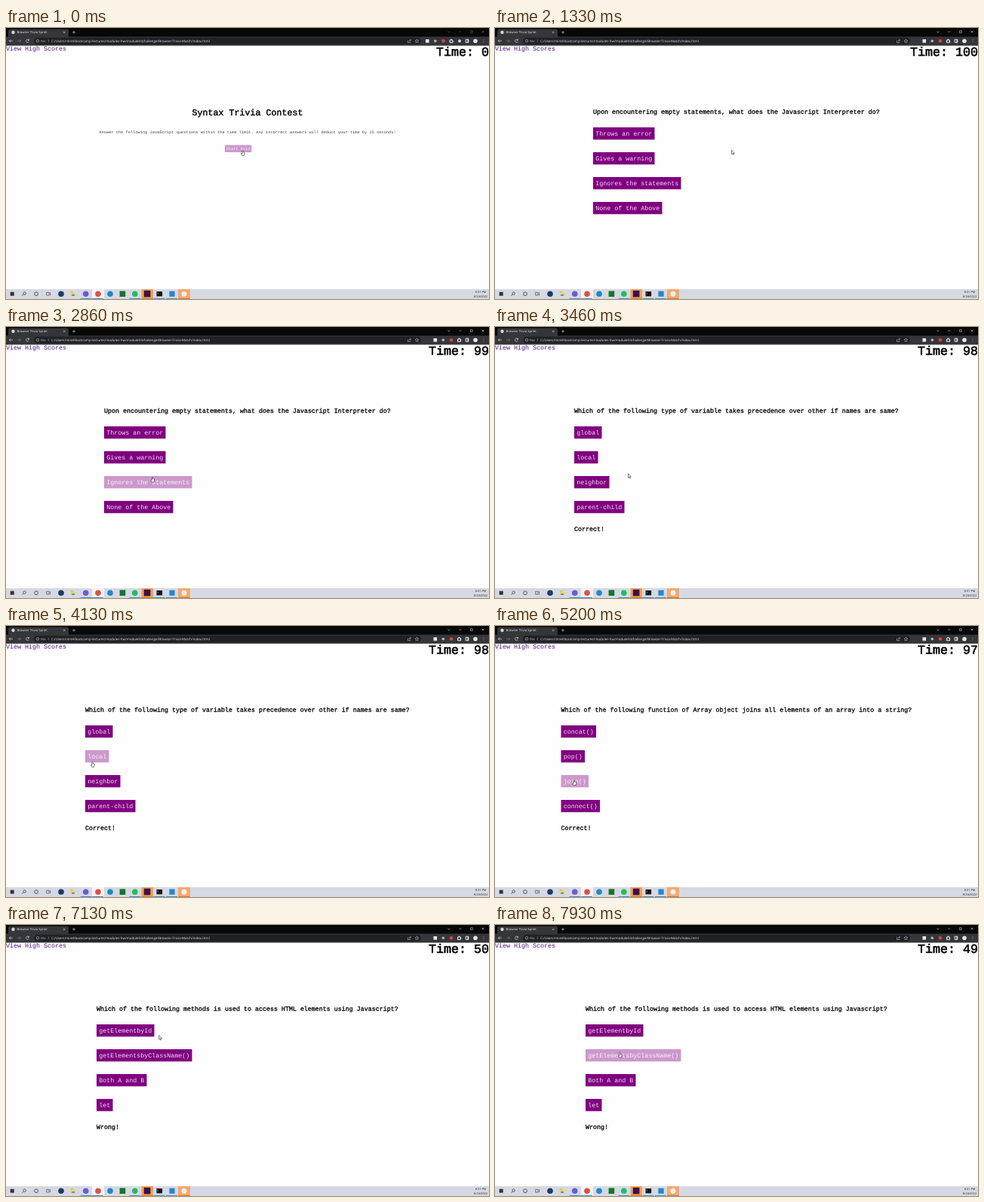
Recreate the animation shown at these times as an HTML page with a canvas. Size 640x360 px, loop 8000 ms.

```html
<!DOCTYPE html>
<html lang="en">
<head>
<meta charset="utf-8">
<title>Quiz</title>
<style>
  html, body { margin: 0; height: 100%; overflow: hidden; background: #fff; }
  canvas { display: block; }
</style>
</head>
<body>
<canvas id="stage" width="640" height="360"></canvas>
<script>
const ctx = document.getElementById('stage').getContext('2d');
const LOOP = 8000, FIRST_TICK = 2330;
const MONO = '"Liberation Mono", monospace', SANS = '"Open Sans", sans-serif';
const PURPLE = '#800080', FADED = '#cc99cc';
const CHAR = 5, BODY = 25 / 3;

// Each question appears at its start time; penalty is the total deducted so far.
const questions = [
  { start: 1260, penalty: 0, text: 'Upon encountering empty statements, what does the Javascript Interpreter do?',
    options: ['Throws an error', 'Gives a warning', 'Ignores the statements', 'None of the Above'] },
  { start: 3130, penalty: 0, verdict: 'Correct!',
    text: 'Which of the following type of variable takes precedence over other if names are same?',
    options: ['global', 'local', 'neighbor', 'parent-child'] },
  { start: 4330, penalty: 0, verdict: 'Correct!',
    text: 'Which of the following function of Array object joins all elements of an array into a string?',
    options: ['concat()', 'pop()', 'join()', 'connect()'] },
  { start: 5400, penalty: 15, verdict: 'Wrong!', text: 'In which HTML element, we put the JavaScript code?',
    options: ['<javascript>', '<style>', '<css>', '<script>'] },
  { start: 6800, penalty: 45, verdict: 'Wrong!',
    text: 'Which of the following methods is used to access HTML elements using Javascript?',
    options: ['getElementbyId', 'getElementsbyClassName()', 'Both A and B', 'let'] }
];

// Pointer stops: time, x, y.
const stops = [
  [0, 313.5, 162.3], [1460, 313.5, 162.3], [2600, 194, 199], [3200, 194, 199], [4060, 114.5, 180.3],
  [4400, 114.5, 180.3], [5060, 105, 204.5], [5460, 105, 204.5], [6230, 194.5, 147], [6330, 194.5, 147],
  [6600, 212, 141], [6860, 212, 141], [7800, 165.5, 169], [LOOP, 165.5, 169]
];

function rect(x, y, w, h, color) {
  ctx.fillStyle = color;
  ctx.fillRect(x, y, w, h);
}

function disc(x, y, r, color) {
  ctx.fillStyle = color;
  ctx.beginPath();
  ctx.arc(x, y, r, 0, Math.PI * 2);
  ctx.fill();
}

function ring(x, y, r, color, width = 0.7) {
  ctx.strokeStyle = color;
  ctx.lineWidth = width;
  ctx.beginPath();
  ctx.arc(x, y, r, 0, Math.PI * 2);
  ctx.stroke();
}

function stroke(d, color, width = 0.7) {
  ctx.strokeStyle = color;
  ctx.lineWidth = width;
  ctx.stroke(new Path2D(d));
}

// Heavy text is regular text with a fine outline, lighter than the bold face.
function text(str, x, y, size, { color = '#000', heavy = false, family = MONO, align = 'left' } = {}) {
  ctx.font = `${size}px ${family}`;
  ctx.fillStyle = ctx.strokeStyle = color;
  ctx.textAlign = align;
  ctx.fillText(str, x, y);
  if (heavy) {
    ctx.lineWidth = size * 0.035;
    ctx.strokeText(str, x, y);
  }
}

function pointerAt(t) {
  const i = stops.findIndex(s => s[0] > t);
  const [t0, x0, y0] = stops[i - 1], [t1, x1, y1] = stops[i];
  const p = (t - t0) / (t1 - t0), e = p * p * (3 - 2 * p);
  return { x: x0 + (x1 - x0) * e, y: y0 + (y1 - y0) * e };
}

function button(label, x, y, w, h, size, pad, pointer) {
  const hover = pointer.x >= x && pointer.x <= x + w && pointer.y >= y && pointer.y <= y + h;
  rect(x, y, w, h, hover ? FADED : PURPLE);
  text(label, x + pad, y + h / 2 + size * 0.34, size, { color: '#ffffffe0' });
  return hover;
}

function drawIntro(pointer) {
  text('Syntax Trivia Contest', 320, 116, 35 / 3, { heavy: true, align: 'center' });
  text('Answer the following JavaScript questions within the time limit. ' +
       'Any incorrect answers will deduct your time by 15 seconds!',
       320, 139.7, 16 / 3, { color: '#444', align: 'center' });
  return button('Start Quiz', 290, 155.5, 35.3, 9.5, 16 / 3, 1.67, pointer);
}

function drawQuestion(q, pointer) {
  const x = 320 - q.text.length * CHAR / 2;
  text(q.text, x, 114, BODY, { heavy: true });
  const hovers = q.options.map((label, i) =>
    button(label, x, 132 + i * 33, label.length * CHAR + 6.5, 16.3, BODY, 3.33, pointer));
  if (q.verdict) text(q.verdict, x, 270.8, BODY, { heavy: true });
  return hovers.includes(true);
}

function drawPointer({ x, y }, hand) {
  const shape = new Path2D(hand
    ? 'M-.6 .6Q0-.5 .6 .6V2.4L2.6 3V5L1.9 7H-.8L-2.2 4.4L-1.6 3.8L-.6 4.5Z'
    : 'M0 0V5.4L1.3 4.3L2.1 6.2L3 5.8L2.2 4H3.8Z');
  ctx.save();
  ctx.translate(x, y);
  ctx.fillStyle = '#fff';
  ctx.fill(shape);
  ctx.strokeStyle = '#222';
  ctx.lineWidth = 0.6;
  ctx.stroke(shape);
  ctx.restore();
}

// Before the window has focus its controls are dim and one more extension shows.
function drawBrowser(focused) {
  const light = '#d5d6d8', controls = focused ? '#f0f0f0' : '#777';
  rect(0, 0, 640, 12, '#080808');
  ctx.fillStyle = '#35363a';
  ctx.beginPath();
  ctx.roundRect(3, 1.5, 80, 12, 2.5);
  ctx.fill();
  rect(0, 11.5, 640, 12, '#35363a');
  disc(9.5, 5.7, 2.2, light);
  text('Browser Trivia Sprint', 14.5, 7.2, 4.2, { color: '#eee', family: SANS });
  stroke('M76 4.5l2.4 2.4m0-2.4l-2.4 2.4M88 5.7h4M90 3.7v4', light, 0.6);
  stroke('M585.5 4.5l1.5 1.5l1.5-1.5M600.3 5h3M615.6 3.7h2.6v2.6h-2.6zM630.7 3.7l2.6 2.6m0-2.6l-2.6 2.6',
         controls, 0.5);

  ctx.fillStyle = '#202124';
  ctx.beginPath();
  ctx.roundRect(37, 12.8, 513, 9, 4.5);
  ctx.fill();
  stroke('M9 17.2H4.3m2-2l-2 2l2 2', light);
  stroke('M15 17.2h4.7m-2-2l2 2l-2 2', '#7d7e82');
  stroke('M30.2 16a2 2 0 1 0 .2 2M30.5 14.7v1.7h-1.7', light);
  ring(42, 17.2, 1.8, light, 0.5);
  stroke('M42 16.8v1.4M56.3 15.4v3.6', light, 0.4);
  text('File', 46, 18.8, 4.2, { color: '#bbb', family: SANS });
  text('C:/Users/mirel/bootcamp-lectures/modules-hw/module04challenge/Browser-Trivia-Match/index.html',
       60, 18.8, 4.48, { color: '#e4e4e6', family: SANS });
  stroke('M532.5 16.5v3h3.2v-1.5M534 18q0-2 2.4-2M535.4 14.7l1.3 1.3l-1.3 1.3', light, 0.5);
  stroke('M544.5 14.8l.7 1.6l1.7.2l-1.3 1.2l.4 1.7l-1.5-.9l-1.5.9l.4-1.7l-1.3-1.2l1.7-.2z', light, 0.5);

  ctx.save();
  if (!focused) {
    disc(601, 17.2, 2, light);
    ctx.translate(-10.5, 0);
  }
  rect(566.5, 15, 4.6, 4.6, '#e8e8e8');
  disc(579.3, 17.2, 1.8, '#b5b6ba');
  disc(590, 17.2, 2.3, '#df4040');
  stroke('M598.5 16.2h1.3v-1h1.3v1h1.4v3h-4z', '#fff', 1);
  ctx.restore();
  stroke('M609.2 15.2h3.6v4h-3.6zM612 15.2v4', '#fff', 0.9);
  disc(622, 17.2, 2.8, '#e3e6e8');
  for (const y of [15.3, 17.2, 19.1]) disc(633, y, 0.45, light);
}

function drawTaskbar() {
  const ink = '#333', line = '#3b8ed0';
  rect(0, 347, 640, 13, '#d6d9e3');
  rect(114, 347, 16, 13, '#f2f3f6');
  rect(179.5, 347, 15.5, 13, '#f1a052');
  rect(228, 347, 16, 13, '#f3a970');
  for (const x of [98.5, 114, 163.5, 195.5, 212]) rect(x, 359, 15, 1, line);
  for (const x of [179.5, 228]) rect(x, 359, 15.5, 1, '#d9771c');

  rect(5.7, 350.7, 5, 5, ink);
  ring(24.6, 352.6, 1.8, ink);
  stroke('M23.3 354l-1.8 1.8', ink);
  ring(40, 353.2, 2.4, ink, 0.8);
  stroke('M53.7 351.3h3.3v3.8h-3.3zM58.6 351v4.5', ink, 0.6);
  rect(85.8, 350.3, 3, 2, '#e9a820');
  rect(85.8, 351.2, 6.4, 4.8, '#fbd25c');
  rect(87.2, 354, 3.6, 2, '#3c94d8');

  disc(73, 353.2, 3.8, '#173e66');
  disc(105.7, 353.2, 3.8, '#6a5cd0');
  disc(122, 353.2, 3.8, '#dc5144');
  disc(138, 353.2, 3.8, '#1d89c5');
  rect(150.6, 349.4, 7.6, 7.6, '#13752a');
  disc(170.8, 353.2, 3.8, '#1fbe5b');
  rect(182.8, 348.8, 8.6, 8.6, '#3a1150');
  rect(199.5, 350, 7.6, 6.4, '#151515');
  stroke('M200.6 351.6l1.2 1l-1.2 1', '#ddd', 0.5);
  rect(216.4, 349.6, 7.2, 7.2, '#2586cc');
  disc(236, 353.2, 3.5, '#e9f0ea');

  const clock = { color: '#222', family: SANS, align: 'center' };
  text('8:31 PM', 629, 352, 3.9, clock);
  text('8/24/2022', 629, 357.7, 3.9, clock);
}

function draw(t) {
  const pointer = pointerAt(t);
  const q = questions.filter(item => item.start <= t).pop();
  const ticks = Math.max(0, Math.floor((t - FIRST_TICK) / 1000) + 1);
  const time = q ? 100 - q.penalty - ticks : 0;

  rect(0, 0, 640, 360, '#fefefe');
  text('View High Scores', 0, 30.3, BODY, { color: '#4b1482' });
  text('Time: ' + time, 640, 36.7, 50 / 3, { heavy: true, align: 'right' });
  const hand = q ? drawQuestion(q, pointer) : drawIntro(pointer);
  drawBrowser(Boolean(q));
  drawTaskbar();
  drawPointer(pointer, hand);
}

ctx.textRendering = 'geometricPrecision';
const begin = performance.now();
function frame() {
  draw((performance.now() - begin) % LOOP);
  requestAnimationFrame(frame);
}
frame();
</script>
</body>
</html>
```
